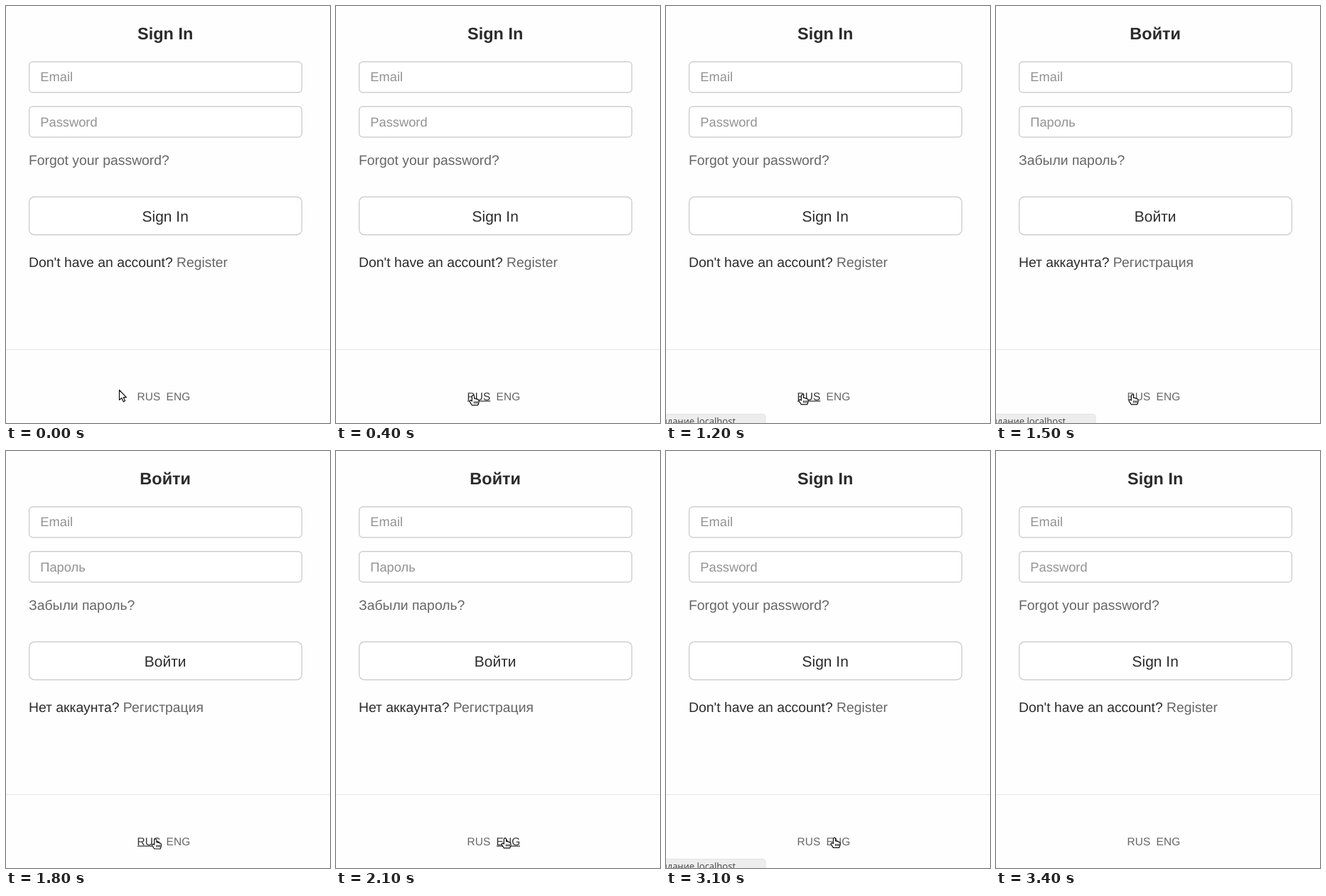
An HTML page for the animation above (5.3 s loop, 456 by 588 pixels).

```html
<!DOCTYPE html>
<html lang="en">
<head>
<meta charset="utf-8">
<title>Sign In</title>
<style>
  html, body { margin: 0; width: 100%; height: 100%; overflow: hidden; background: #fefefe; }
  svg { display: block; width: 456px; height: 588px; }
  text { font-family: "Liberation Sans", Arial, sans-serif; fill: #2b2b2b; text-rendering: geometricPrecision; white-space: pre; }
  .mid { text-anchor: middle; }
  .field { font-size: 18.3px; fill: #929292; }
  .body { font-size: 19.35px; }
  .link { fill: #666; }
  .lang { font-size: 15.5px; }
  .lang.hover { fill: #333; }
  .box { fill: #fff; stroke: #c8c8c8; stroke-width: 1.2; }
  .line { stroke: #333; stroke-width: 1.2; }
  .pointer path { fill: #fff; stroke: #111; stroke-width: 1.2; stroke-linejoin: round; }
</style>
</head>
<body>
<svg viewBox="0 0 456 588">
  <text id="title" class="mid" x="224.2" y="47" font-size="23.5" font-weight="bold"></text>

  <rect class="box" x="32.6" y="78.6" width="383.8" height="43.2" rx="5"/>
  <path d="M37 79.8H412" stroke="#eee"/>
  <text class="field" x="48.3" y="106">Email</text>
  <rect class="box" x="32.6" y="141.6" width="383.8" height="43.2" rx="5"/>
  <path d="M37 142.8H412" stroke="#eee"/>
  <text id="password" class="field" x="48.3" y="169.5"></text>

  <text id="forgot" class="body link" x="32" y="224"></text>
  <rect class="box" x="32.6" y="269.1" width="383.8" height="53.6" rx="7.5"/>
  <text id="button" class="mid" x="224.2" y="304" font-size="21"></text>
  <text class="body" x="32" y="368"><tspan id="ask"></tspan> <tspan id="register" class="link"></tspan></text>

  <path d="M0 484.5H456" stroke="#e6e6e6"/>
  <text id="rus" class="lang link" x="184.6" y="555.5">RUS</text>
  <text id="eng" class="lang link" x="225.6" y="555.5">ENG</text>
  <path id="rusLine" class="line" d="M185 557.2H217.3"/>
  <path id="engLine" class="line" d="M226 557.2H259"/>

  <g id="status">
    <path d="M-2 575.5H136Q140 575.5 140 580V590H-2Z" fill="#ededed" stroke="#e2e2e2"/>
    <text x="98" y="589.5" text-anchor="end" style="font:13px 'Open Sans','Noto Sans',sans-serif;fill:#444">Ожидание localhost</text>
  </g>

  <g id="arrow" class="pointer">
    <path d="M0 0V14L3.3 11.2L5.8 16.4L8.1 15.3L5.7 10.3H10Z"/>
  </g>
  <g id="hand" class="pointer">
    <path d="M-1.6 8V1.2Q-1.6 -.2 0 -.2T1.6 1.2V4.6Q3 3.8 4 5.2Q5.5 4.6 6.2 6Q8 5.6 8 7.4V10.5L6.7 13.8H-1.6L-4.6 9.3Q-5.4 7.6 -3.8 7.1Q-2.6 7 -1.6 8Z"/>
    <path d="M1.6 8.4V11.4M3.8 8.4V11.4M6 8.4V11.4" stroke-width=".7"/>
  </g>
</svg>
<script>
const LOOP = 5300;
const words = {
  en: { title: "Sign In", password: "Password", forgot: "Forgot your password?",
        button: "Sign In", ask: "Don't have an account?", register: "Register" },
  ru: { title: "Войти", password: "Пароль", forgot: "Забыли пароль?",
        button: "Войти", ask: "Нет аккаунта?", register: "Регистрация" }
};
// time, x, y of the pointer's hot spot
const path = [[0, 159.5, 541.5], [400, 193, 549], [800, 193, 549], [900, 192, 548],
  [1600, 192, 548], [2100, 238, 546], [2500, 238, 546], [2600, 237, 545.5], [LOOP, 237, 545.5]];

const el = id => document.getElementById(id);
const show = (id, on) => el(id).style.display = on ? "" : "none";
const within = (v, a, b) => v >= a && v < b;

function pointerAt(t) {
  const i = path.findIndex(p => p[0] > t);
  const [t0, x0, y0] = path[i - 1], [t1, x1, y1] = path[i];
  const k = (t - t0) / (t1 - t0);
  return [x0 + (x1 - x0) * k, y0 + (y1 - y0) * k];
}

let shown;
function setLanguage(lang) {
  if (lang === shown) return;
  shown = lang;
  for (const id in words[lang]) el(id).textContent = words[lang][id];
}

function draw(time) {
  const t = Math.floor(time % LOOP / 100) * 100;
  const [x, y] = pointerAt(t);
  const visible = t < 3400;
  const onRus = within(x, 184.5, 217.5), onEng = within(x, 225.5, 259);
  // a freshly loaded page ignores the pointer until it moves
  const hover = visible && !within(t, 1300, 1700) && t < 3100;

  setLanguage(within(t, 1300, 3100) ? "ru" : "en");
  show("status", within(t, 1100, 1700) || within(t, 2900, 3400));
  for (const [id, over] of [["rus", onRus], ["eng", onEng]]) {
    el(id).classList.toggle("hover", hover && over);
    show(id + "Line", hover && over);
  }
  for (const [id, on] of [["hand", onRus || onEng], ["arrow", !onRus && !onEng]]) {
    show(id, visible && on);
    el(id).setAttribute("transform", `translate(${x} ${y})`);
  }
}

const start = performance.now();
function tick() {
  draw(performance.now() - start);
  requestAnimationFrame(tick);
}
tick();
</script>
</body>
</html>
```
